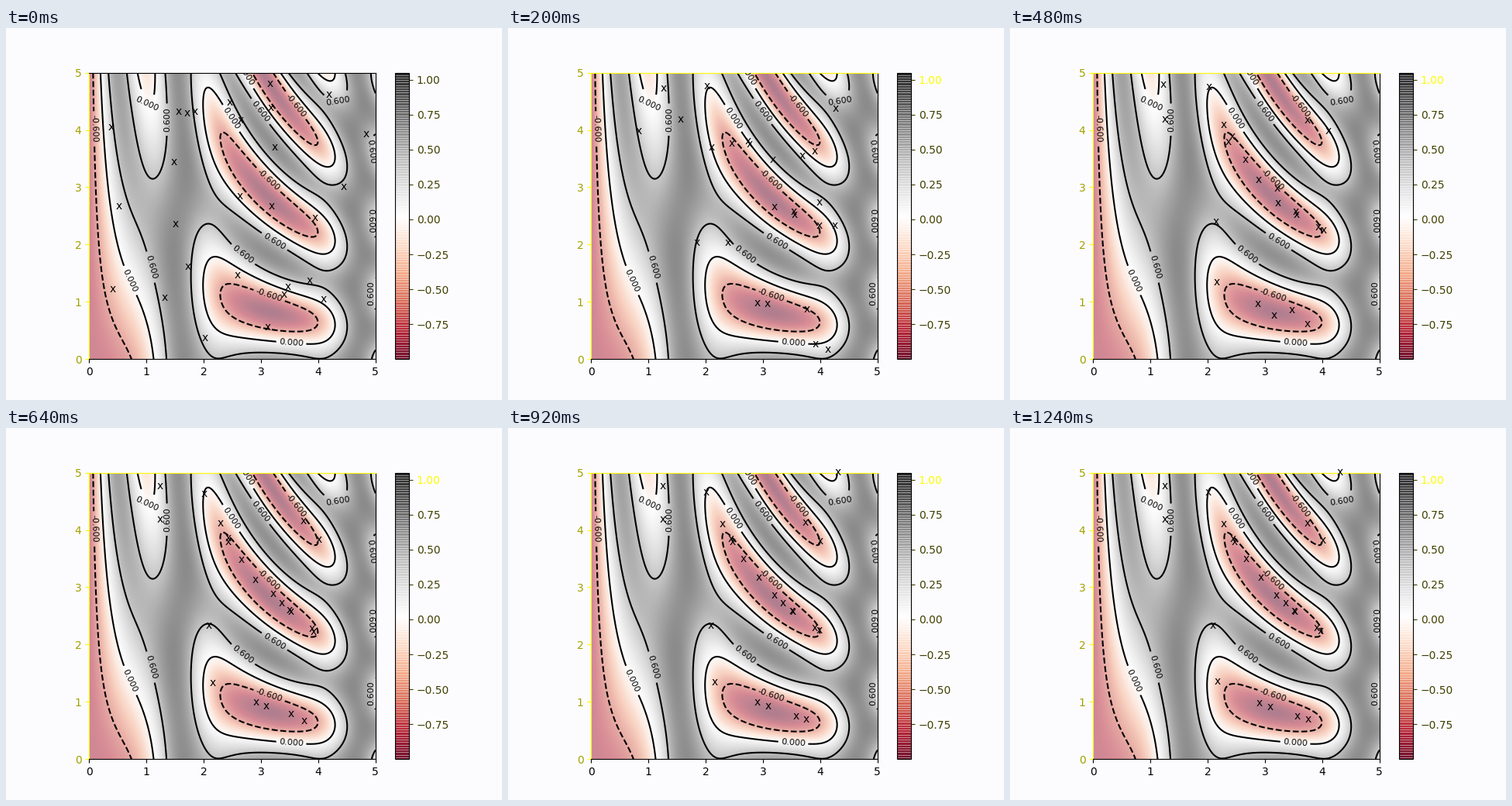
A matplotlib script for the animation above (1.28 s loop, 640 by 480 pixels).

```python
import numpy as np
import matplotlib.pyplot as plt
from matplotlib.animation import FuncAnimation

FRAMES, INTERVAL = 32, 40
PAPER, YELLOW, OLIVE = "#fcfcfe", "#fcfc00", "#404000"
SIDE = 5


def height(x, y):
    return np.sin(x) ** 10 + np.cos(10 + y * x) * np.cos(x)


fig, ax = plt.subplots(figsize=(6.4, 4.8), dpi=100, facecolor=PAPER)
ax.set_facecolor(PAPER)

axis = np.linspace(0, SIDE, 200)
X, Y = np.meshgrid(axis, axis)
Z = height(X, Y)
image = ax.imshow(Z, extent=[0, SIDE, 0, SIDE], origin="lower", cmap="RdGy",
                  alpha=0.5)
bar = fig.colorbar(image)
bar.solids.set(edgecolor="face", linewidth=0.4)
bar.ax.tick_params(color=OLIVE, labelcolor=OLIVE)

lines = ax.contour(X, Y, Z, levels=[-0.6, 0, 0.6], colors="black")
label_spots = [(1.03, 4.47), (1.35, 4.18), (0.12, 4.02), (0.73, 1.38),
               (1.09, 1.61), (2.49, 4.21), (3.00, 4.33), (3.62, 4.44),
               (4.34, 4.51), (3.14, 3.14), (3.24, 2.06), (2.69, 1.83),
               (3.15, 1.13), (3.53, 0.30), (4.95, 3.63), (4.89, 2.41),
               (4.89, 1.15), (2.74, 4.97)]
ax.clabel(lines, inline=True, fontsize=8, fmt="%1.3f", manual=label_spots)

ax.tick_params(axis="y", color=YELLOW, labelcolor="#a0a000")
ax.spines["left"].set_color(YELLOW)

# Valleys of the surface follow x * y = k * pi - 10; particles rest along them.
valleys = {4: [2.11, 2.85, 3.04, 3.51, 3.70],
           6: [1.96, 2.23, 2.38, 2.41, 2.61, 2.87, 3.15, 3.30, 3.46, 3.47,
               3.85, 3.92],
           8: [3.68, 3.95],
           10: [4.25]}
loners = [(1.19, 4.71), (1.20, 4.13), (2.04, 2.28)]
rest = np.array([(x, (k * np.pi - 10) / x + 0.1 * np.sin(x))
                 for k, xs in valleys.items() for x in xs] + loners)

STRAYS = 5
rng = np.random.default_rng(7)
start = rng.uniform(0.3, 4.8, rest.shape)
spin = rng.uniform(0.1, 0.5, (len(rest), 1))
stray_start = rng.uniform(0.5, 4.8, (STRAYS, 2))


def swarm(n):
    """Damped swings towards the valleys, while strays drift outwards."""
    swing = np.exp(-n / 4) * np.cos(spin * n)
    settling = rest + (start - rest) * swing
    leaving = stray_start + (stray_start - SIDE / 2) * 0.12 * n
    return np.vstack([settling, leaving])


marks = [ax.text(0, 0, "x", fontsize=10) for _ in range(len(rest) + STRAYS)]


def update(n):
    for mark, (x, y) in zip(marks, swarm(n)):
        mark.set_position((x, y))
        mark.set_visible(0 <= x <= SIDE and 0 <= y <= SIDE)
    ax.spines["top"].set_color(YELLOW if n else "black")
    bar.ax.get_yticklabels()[-2].set_color(YELLOW if n else OLIVE)
    return marks


anim = FuncAnimation(fig, update, frames=FRAMES, interval=INTERVAL,
                     repeat=True, repeat_delay=0)
plt.show()
```
